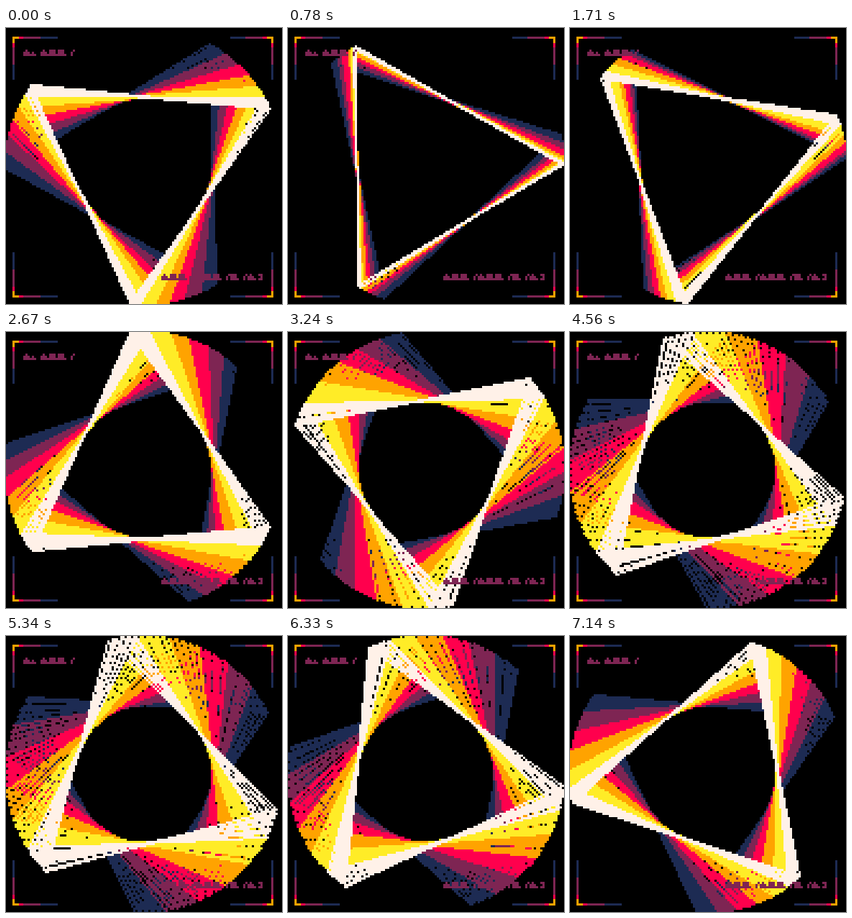
An HTML page with a canvas for the animation above (7170 ms loop, 384x384 px).

```html
<!DOCTYPE html>
<html lang="en">
<head>
<meta charset="utf-8">
<title>Swinging triangle</title>
<style>
  html, body { margin: 0; width: 100%; height: 100%; overflow: hidden; background: #000; }
  canvas { display: block; width: 100vw; height: 100vh; image-rendering: pixelated; }
</style>
</head>
<body>
<canvas id="screen" width="128" height="128"></canvas>
<script>
const SIZE = 128, CENTER = 64, RADIUS = 64;
const LOOP_MS = 7170, STEP_MS = 30;
const TURNS_PER_STEP = 0.002;   // swing phase gained per step
const PEAK_STEP = 29.5;         // step at which the swing turns back
const LAYERS = 60, LAYER_LAG = 0.0006;

const BLUE = '#1d2b53', PURPLE = '#7e2553', RED = '#ff004d',
      ORANGE = '#ffa300', YELLOW = '#ffec27', WHITE = '#fff1e8';
const TRAIL = [WHITE, YELLOW, ORANGE, RED, PURPLE, BLUE];

const GLYPHS = {
  A: [' #  ', '### ', '####'],
  E: ['### ', '### ', '####'],
  '.': ['    ', '#   ', '##  '],
  '/': ['   #', '  # ', '  # '],
  I: [' ## ', '  # ', ' ## '],
};

const ctx = document.getElementById('screen').getContext('2d');
const dot = (x, y) => ctx.fillRect(x, y, 1, 1);

function line(x0, y0, x1, y1) {
  const dx = x1 - x0, dy = y1 - y0;
  const n = Math.max(Math.abs(dx), Math.abs(dy)) || 1;
  for (let k = 0; k <= n; k++) {
    dot(Math.round(x0 + dx * k / n), Math.round(y0 + dy * k / n));
  }
}

function triangle(turn) {
  const corners = [0, 1, 2].map(k => {
    const a = 2 * Math.PI * (turn + k / 3);
    return [Math.floor(CENTER + RADIUS * Math.cos(a)),
            Math.floor(CENTER + RADIUS * Math.sin(a))];
  });
  corners.forEach((p, k) => line(...p, ...corners[(k + 1) % 3]));
}

function bracketColor(distance) {
  if (distance < 3) return ORANGE;
  if (distance < 5) return RED;
  return distance < 13 ? PURPLE : BLUE;
}

function brackets() {
  const left = 3, top = 4, right = 123, bottom = 124;
  for (let d = 20; d >= 0; d--) {
    ctx.fillStyle = bracketColor(d);
    for (const y of [top, bottom]) {
      dot(left + d, y);
      if (d < 20) dot(right - d, y);
    }
    for (const x of [left, right]) {
      if (d < 20) dot(x, top + d);
      dot(x, bottom - d);
    }
  }
}

function label(text, x, y) {
  ctx.fillStyle = PURPLE;
  [...text].forEach((ch, i) => GLYPHS[ch].forEach((row, r) =>
    [...row].forEach((cell, c) => {
      if (cell === '#') dot(x + 4 * i + c, y + r);
    })));
}

function draw(step) {
  ctx.fillStyle = '#000';
  ctx.fillRect(0, 0, SIZE, SIZE);
  const phase = (step - PEAK_STEP) * TURNS_PER_STEP;
  for (let i = LAYERS - 1; i >= 0; i--) {
    ctx.fillStyle = TRAIL[Math.floor(i * TRAIL.length / LAYERS)];
    triangle(Math.cos(2 * Math.PI * (phase - i * LAYER_LAG)));
  }
  brackets();
  label('A.AEE/', 8, 10);
  label('AEE/AEE/E/AI', 72, 114);
}

let shown = -1;
function tick() {
  const step = Math.floor((performance.now() % LOOP_MS) / STEP_MS);
  if (step !== shown) draw(shown = step);
  requestAnimationFrame(tick);
}
tick();
</script>
</body>
</html>
```
